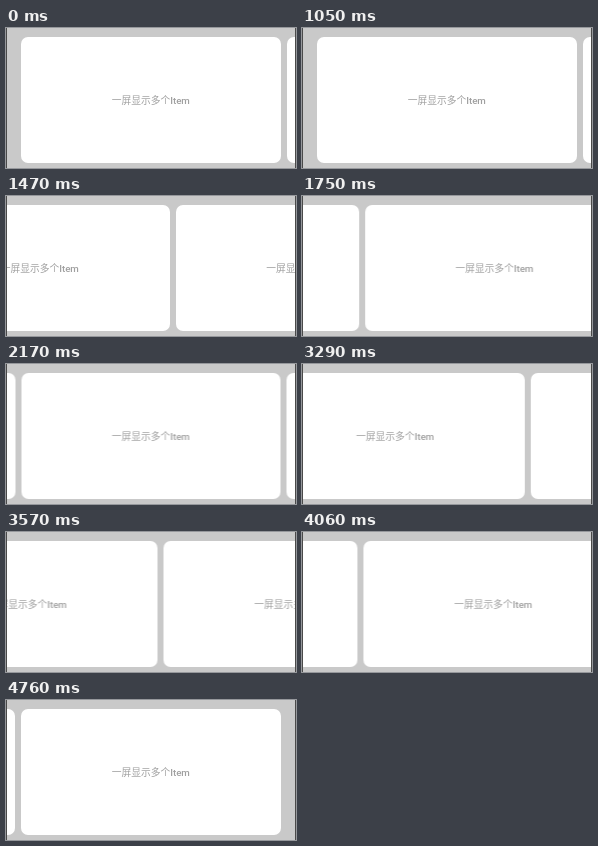
An HTML page for the animation above (5180 ms loop, 290 px wide and 140 px high).

```html
<!DOCTYPE html>
<html lang="zh-CN">
<head>
<meta charset="utf-8">
<title>Pager</title>
<style>
  html, body { margin: 0; width: 100%; height: 100%; overflow: hidden; }
  #stage {
    position: relative; width: 290px; height: 140px;
    overflow: hidden; background: #c9c9c9;
  }
  #stage::after {
    content: ""; position: absolute; inset: 0;
    border: solid #4a4a4a; border-width: 0 1px;
  }
  #track { position: absolute; left: 15px; top: 9px; display: flex; gap: 6px; }
  .card {
    flex: none; width: 259.5px; height: 125.5px; border-radius: 7px;
    background: #fff; color: #a0a0a0; text-align: center;
    font: 500 9.75px/127.5px Roboto, "Noto Sans CJK SC", "Noto Sans CJK", sans-serif;
    white-space: nowrap;
  }
</style>
</head>
<body>
<div id="stage">
  <div id="track">
    <div class="card">一屏显示多个Item</div>
    <div class="card">一屏显示多个Item</div>
    <div class="card">一屏显示多个Item</div>
  </div>
</div>
<script>
  const LOOP = 5180, STEP = 70, PAGE = 265.5;

  const easeIn = power => p => p ** power;
  const easeOut = p => 1 - (1 - p) ** 2;

  // Two swipes: drag, then settle; the second pauses before its release.
  const moves = [
    { start: 1050, end: 1470, to: 111, ease: easeIn(2) },
    { start: 1470, end: 2100, to: PAGE, ease: easeOut },
    { start: 3010, end: 3570, to: PAGE + 123, ease: easeIn(1.25) },
    { start: 3570, end: 3850, to: PAGE + 183, ease: easeOut },
    { start: 3990, end: 4270, to: PAGE * 2, ease: easeOut }
  ];

  function scrollAt(time) {
    let x = 0;
    for (const { start, end, to, ease } of moves) {
      const p = Math.min(1, Math.max(0, (time - start) / (end - start)));
      x += (to - x) * ease(p);
    }
    return x;
  }

  const frames = [];
  for (let time = 0; time <= LOOP; time += STEP)
    frames.push({
      offset: time / LOOP,
      transform: `translateX(${-scrollAt(time)}px)`,
      easing: "step-end"
    });

  document.getElementById("track")
    .animate(frames, { duration: LOOP, iterations: Infinity });
</script>
</body>
</html>
```
